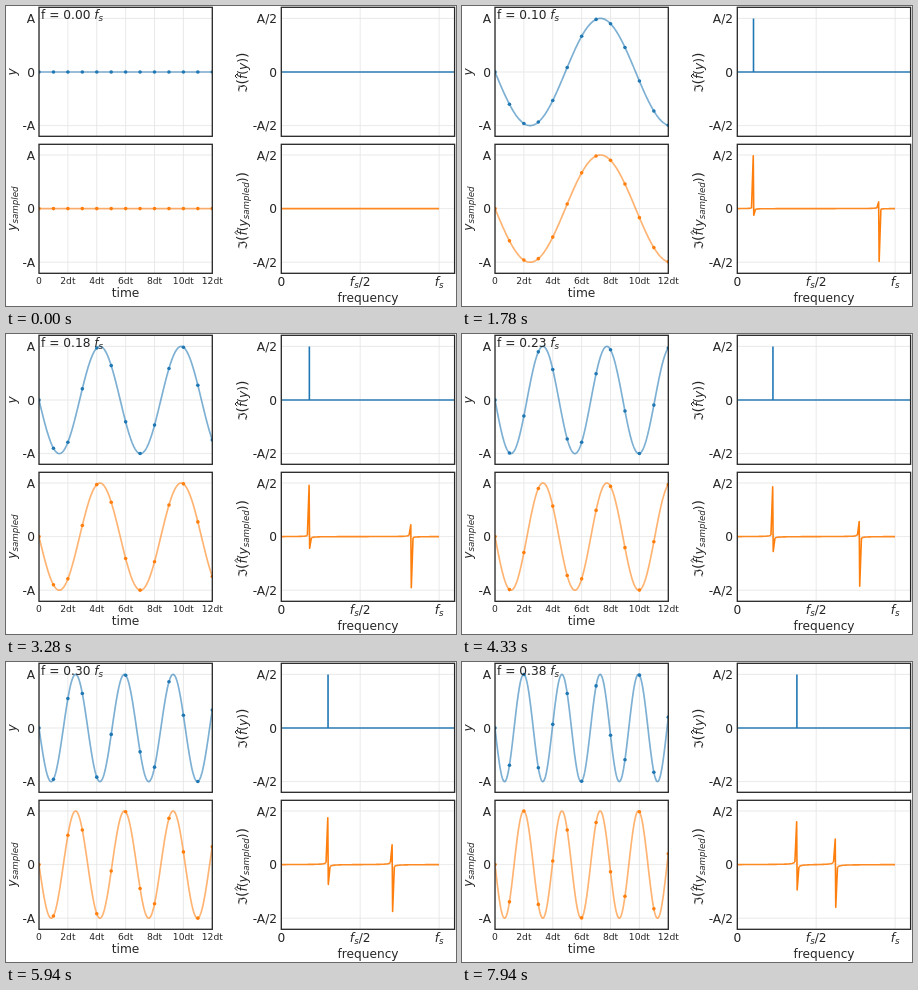
Write an HTML page that moves like this. It is 450 by 300 pixels and loops after 8 s.

```html
<!DOCTYPE html>
<html lang="en">
<head>
<meta charset="utf-8">
<title>Sampling a sine wave</title>
<style>
  html, body { margin: 0; width: 100%; height: 100%; overflow: hidden; background: #fff; }
  svg { display: block; }
  text { font: 12.2px "DejaVu Sans", sans-serif; fill: #262626; white-space: pre; }
  .small { font-size: 9.2px; }
  .i { font-style: italic; }
  .sub { font-size: 8.7px; font-style: italic; }
  .big { font-size: 14px; }
  .grid { stroke: #e4e4e4; stroke-width: .8; }
  .frame { fill: none; stroke: #262626; stroke-width: 1.3; }
  .line { fill: none; stroke-linejoin: round; }
</style>
</head>
<body>
<svg id="stage" width="450" height="300" viewBox="0 0 450 300"></svg>
<script>
const NS = 'http://www.w3.org/2000/svg';
const stage = document.getElementById('stage');
const BLUE = '#1f77b4', ORANGE = '#ff7f0e';
const LEFT = 33, RIGHT = 275.3, WIDTH = 173.3, HEIGHT = 129;
const DT = WIDTH / 12, FS = 157.8, AMP = 53.6;
const ROWS = [{ top: 1.3, mid: 66, color: BLUE }, { top: 138.3, mid: 202.6, color: ORANGE }];
const LOOP = 8000, STEP = 1000 / 18;

// Signal frequency (in units of fs) at selected steps.
const SWEEP = [[0, 0], [32, .1027], [59, .1778], [78, .2259], [107, .2962], [130, .3479], [143, .3777]];

function add(parent, tag, attrs = {}, html = '') {
  const node = document.createElementNS(NS, tag);
  for (const key in attrs) node.setAttribute(key, attrs[key]);
  if (html) node.innerHTML = html;
  parent.append(node);
  return node;
}

function label(x, y, html, anchor = 'middle', cls = '') {
  return add(stage, 'text', { x, y, 'text-anchor': anchor, class: cls }, html);
}

function sideLabel(x, y, html, anchor = 'start') {
  const g = add(stage, 'g', { transform: `translate(${x} ${y}) rotate(-90)` });
  add(g, 'text', { 'text-anchor': anchor }, html);
  return g;
}

// A plotting area that keeps stage coordinates but clips its content.
function panel(x, row, columns) {
  const y = row.top;
  const area = add(stage, 'svg', { x, y, width: WIDTH, height: HEIGHT, viewBox: `${x} ${y} ${WIDTH} ${HEIGHT}` });
  for (const cx of columns) add(area, 'line', { class: 'grid', x1: cx, x2: cx, y1: y, y2: y + HEIGHT });
  for (const k of [-1, 0, 1]) {
    const cy = row.mid + k * AMP;
    add(area, 'line', { class: 'grid', x1: x, x2: x + WIDTH, y1: cy, y2: cy });
  }
  add(stage, 'rect', { class: 'frame', x, y, width: WIDTH, height: HEIGHT });
  return area;
}

const stroke = (area, color, width, opacity = 1) =>
  add(area, 'path', { class: 'line', stroke: color, 'stroke-width': width, 'stroke-opacity': opacity });

const timeTicks = [0, 2, 4, 6, 8, 10, 12];
for (const row of ROWS) {
  const timeArea = panel(LEFT, row, timeTicks.map(n => LEFT + n * DT));
  const freqArea = panel(RIGHT, row, [RIGHT + FS / 2, RIGHT + FS]);
  row.wave = stroke(timeArea, row.color, 1.7, .58);
  row.dots = Array.from({ length: 13 }, (_, n) =>
    add(timeArea, 'circle', { cx: LEFT + n * DT, r: 1.8, fill: row.color }));
  row.base = stroke(freqArea, row.color, row.color === BLUE ? 1.9 : 1.6, row.color === BLUE ? .7 : .9);
  row.peak = stroke(freqArea, row.color, 1.6);
  ['A', '0', '-A'].forEach((name, k) => {
    const y = row.mid + (k - 1) * AMP + 4.6;
    label(29, y, name, 'end');
    label(271, y, k === 1 ? name : name + '/2', 'end');
  });
}

const fs = '<tspan class="i">f</tspan><tspan class="sub" dy="2">s</tspan>';
timeTicks.forEach(n => label(LEFT + n * DT, 278, n ? n + 'dt' : '0', 'middle', 'small'));
label(119.5, 291, 'time');
label(RIGHT, 280, '0');
label(RIGHT + FS / 2, 280, fs + '<tspan dy="-2">/2</tspan>');
label(RIGHT + FS, 280, fs);
label(362, 295.5, 'frequency');

const y = '<tspan class="i">y</tspan>';
const ySampled = y + '<tspan class="sub" dy="2">sampled</tspan>';
const transform = (inner, back) =>
  `ℑ<tspan class="big">(</tspan><tspan class="i">f</tspan>(${inner}<tspan dy="${back}">)</tspan><tspan class="big">)</tspan>`;
sideLabel(10, 66, y, 'middle');
sideLabel(10, 202.6, ySampled, 'middle');
for (const [start, inner, back] of [[87, y, 0], [243.5, ySampled, -2]]) {
  const g = sideLabel(241, start, transform(inner, back));
  add(g, 'path', { d: 'M14.8-9.8L17-12L19.2-9.8', fill: 'none', stroke: '#262626' });
}
const readout = label(35, 13.2, `f = <tspan>0.00</tspan> ${fs}`, 'start').querySelector('tspan');

// Smooth curve through the sweep points.
function frequencyAt(step) {
  const last = SWEEP.length - 1;
  let k = 0;
  while (k < last - 1 && step > SWEEP[k + 1][0]) k++;
  const slope = i => {
    const a = SWEEP[Math.max(i - 1, 0)], b = SWEEP[Math.min(i + 1, last)];
    return (b[1] - a[1]) / (b[0] - a[0]);
  };
  const [x0, f0] = SWEEP[k], [x1, f1] = SWEEP[k + 1];
  const h = x1 - x0, u = (step - x0) / h, v = 1 - u;
  return f0 * v * v * (1 + 2 * u) + f1 * u * u * (1 + 2 * v)
    + h * u * v * (slope(k) * v - slope(k + 1) * u);
}

const path = points => 'M' + points.map(p => p[0].toFixed(2) + ' ' + p[1].toFixed(2)).join('L');

function drawWave(row, f) {
  const at = t => row.mid + AMP * Math.sin(2 * Math.PI * f * t);
  row.wave.setAttribute('d', path(Array.from({ length: 241 }, (_, i) => [LEFT + i / 20 * DT, at(i / 20)])));
  row.dots.forEach((dot, n) => dot.setAttribute('cy', at(n)));
}

function drawPureSpectrum({ base, peak, mid }, f) {
  const x = RIGHT + f * FS;
  base.setAttribute('d', path([[RIGHT, mid], [RIGHT + WIDTH, mid]]));
  peak.setAttribute('d', f ? path([[x, mid], [x, mid - AMP]]) : '');
}

// Peak and mirrored peak, each with leakage tails, odd around fs / 2.
function drawSampledSpectrum({ base, peak, mid }, f) {
  if (!f) {
    base.setAttribute('d', path([[RIGHT, mid], [RIGHT + FS, mid]]));
    peak.setAttribute('d', '');
    return;
  }
  const cot = u => 1 / Math.tan(Math.PI * u);
  const gap = Math.min(2 / FS, f / 2);
  const tail = u => [RIGHT + u * FS, mid + .26 * f * (cot(u - f) + cot(u + f))];
  const span = (a, b) => Array.from({ length: 41 }, (_, i) => tail(a + (b - a) * i / 40));
  const tall = AMP * (1 - 1.42 * f * f), low = AMP * f * (1.2 + .15 * f);
  const spike = (u, up, down, shift) => {
    const x = RIGHT + u * FS + shift;
    return [tail(u - gap), [x - .25, mid - up], [x + .25, mid + down], tail(u + gap)];
  };
  const edge = 1e-4;
  base.setAttribute('d', path(span(edge, f - gap)) + path(span(f + gap, 1 - f - gap)) + path(span(1 - f + gap, 1 - edge)));
  peak.setAttribute('d', path(spike(f, tall, low, 0)) + path(spike(1 - f, low, tall, 0)));
}

function draw(now) {
  const time = Math.floor(now % LOOP / 10) * 10;
  const f = frequencyAt(Math.min(143, Math.floor((time + 5) / STEP)));
  ROWS.forEach(row => drawWave(row, f));
  drawPureSpectrum(ROWS[0], f);
  drawSampledSpectrum(ROWS[1], f);
  readout.textContent = f.toFixed(2);
}

const start = performance.now();
function tick() {
  draw(performance.now() - start);
  requestAnimationFrame(tick);
}
tick();
</script>
</body>
</html>
```
